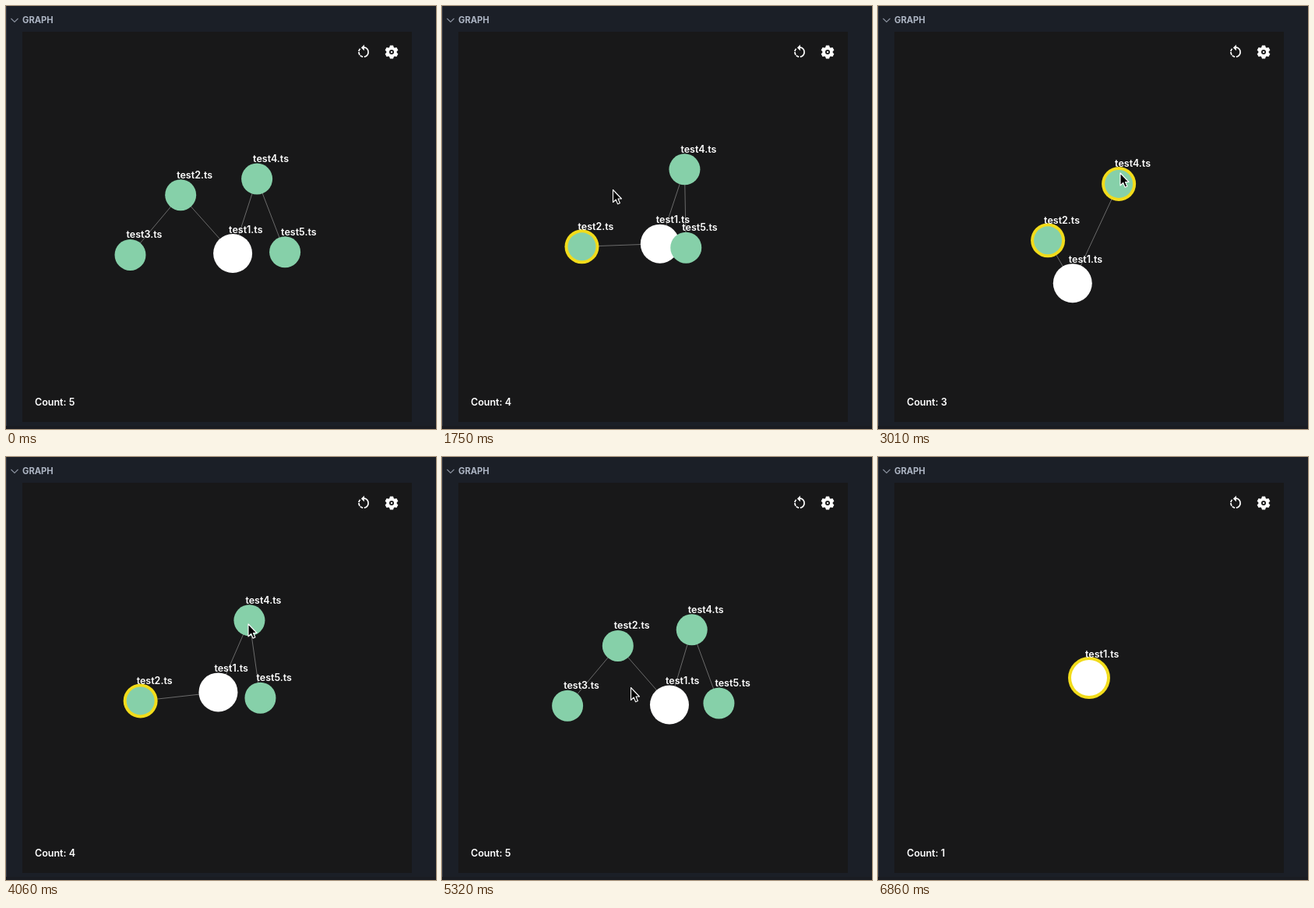
Animation, 552 px wide and 542 px high, one loop 7.07 s. Source, as an HTML page with a canvas:

```html
<!DOCTYPE html>
<html lang="en">
<head>
<meta charset="utf-8">
<title>Graph</title>
<style>
  html, body { margin: 0; width: 100%; height: 100%; overflow: hidden; background: #1b1f27; }
  canvas { display: block; }
</style>
</head>
<body>
<canvas></canvas>
<script>
const W = 552, H = 542, LOOP = 7070, STEP = 70;
const CENTER = [271, 283], LINK = 100.4;
const WHITE = '#fff', GREEN = '#86d0a9', YELLOW = '#f2dc1b', PANEL = '#181819';
const canvas = document.querySelector('canvas');
const ratio = window.devicePixelRatio || 1;
canvas.width = W * ratio;
canvas.height = H * ratio;
canvas.style.width = W + 'px';
canvas.style.height = H + 'px';
const ctx = canvas.getContext('2d');

// Each click starts a tree: links have a resting angle, and start off by a turn and a stretch.
const link = (from, to, angle, turn, stretch = 0) => ({ from, to, angle, turn, stretch });
const four = [link(1, 2, 171.8, 9), link(1, 4, -64.2, -11), link(4, 5, 78.8, 15)];
const five = [link(1, 2, -131.8, 6), link(2, 3, 130.1, 0), link(1, 4, -72, -14), link(4, 5, 69, 8)];
const three = [link(1, 2, 149, 91, -37), link(1, 4, -73, 8, 40)];
const scenes = [
  { at: -LOOP, links: five },
  { at: 1680, links: four, rings: [2] },
  { at: 3010, links: three, rings: [2, 4], tau: 90, drift: [-12, 11.5] },
  { at: 3780, links: four, rings: [2] },
  { at: 4900, links: five },
  { at: 6090, links: [], rings: [1] }
];

// Pointer stops: x, y, arrival and departure
const stop = (x, y, arrive, leave = arrive) => ({ x, y, arrive, leave });
const stops = [
  stop(318, 500, 70), stop(177, 205, 280), stop(246, 403, 420, 770), stop(240.5, 337.5, 840),
  stop(219.5, 235.5, 1050, 1960), stop(311, 214, 2450, 4130), stop(172, 308, 4620, 5040),
  stop(242.5, 295.5, 5320), stop(279.5, 314.5, 5600, 6370), stop(283, 560, 6860)
];
const arrow = new Path2D('M0 0V16l3.7-3.5 2.4 5.7 2.8-1.2-2.4-5.5H11z');

function rect(x, y, w, h, fill) {
  ctx.fillStyle = fill;
  ctx.fillRect(x, y, w, h);
}

function disc([x, y], r, fill) {
  ctx.beginPath();
  ctx.arc(x, y, r, 0, 2 * Math.PI);
  ctx.fillStyle = fill;
  ctx.fill();
}

function line(points, color, width) {
  ctx.beginPath();
  points.forEach(p => ctx.lineTo(...p));
  ctx.strokeStyle = color;
  ctx.lineWidth = width;
  ctx.stroke();
}

function text(s, x, y, color = WHITE, font = '600 12.5px') {
  ctx.font = font + ' Inter, Roboto, sans-serif';
  ctx.fillStyle = color;
  ctx.fillText(s, x, y);
}

function gear(x, y) {
  ctx.save();
  ctx.translate(x, y);
  disc([0, 0], 6.6, WHITE);
  for (let i = 0; i < 6; i++) {
    ctx.beginPath();
    ctx.moveTo(-3, -5.5);
    ctx.lineTo(-2, -8.5);
    ctx.lineTo(2, -8.5);
    ctx.lineTo(3, -5.5);
    ctx.fill();
    ctx.rotate(Math.PI / 3);
  }
  disc([0, 0], 3, PANEL);
  disc([0, 0], 1.2, WHITE);
  ctx.restore();
}

// Turning arrow: solid right half, three dashes on the left
function resetIcon(x, y) {
  const arc = (from, to) => {
    ctx.beginPath();
    ctx.arc(x, y, 6.1, from * Math.PI / 180, to * Math.PI / 180);
    ctx.stroke();
  };
  ctx.strokeStyle = ctx.fillStyle = WHITE;
  ctx.lineWidth = 1.75;
  arc(-82, 82);
  for (const a of [98, 143, 188]) arc(a, a + 36);
  ctx.beginPath();
  ctx.moveTo(x + 0.9, y - 9.5);
  ctx.lineTo(x - 3.1, y - 5.6);
  ctx.lineTo(x + 0.9, y - 1.7);
  ctx.fill();
}

function drawPanel() {
  rect(0, 0, W, H, '#1b1f27');
  rect(0, 0, 1, H, '#343a46');
  rect(0, 538, W, 4, '#1a1c22');
  rect(21, 33, 500, 500, PANEL);
  line([[6.5, 16], [11, 20.5], [15.5, 16]], '#8b929f', 1.1);
  text('GRAPH', 21, 22, '#adb5c3', '700 11.2px');
  resetIcon(459, 59);
  gear(495, 59);
}

// Places the tree around its centre of mass; k falls from 1 to 0 as it settles.
function layout({ links, drift = [0, 0] }, k) {
  const at = { 1: [0, 0] };
  for (const l of links) {
    const a = (l.angle + l.turn * k) * Math.PI / 180, r = LINK + l.stretch * k;
    const [x, y] = at[l.from];
    at[l.to] = [x + r * Math.cos(a), y + r * Math.sin(a)];
  }
  const all = Object.values(at);
  const shift = CENTER.map((c, i) =>
    c + drift[i] * k - all.reduce((sum, p) => sum + p[i], 0) / all.length);
  for (const p of all) p.forEach((v, i) => p[i] = v + shift[i]);
  return at;
}

function drawGraph(t) {
  const scene = scenes.findLast(s => s.at <= t);
  const { links, rings = [], tau = 180 } = scene;
  const at = layout(scene, Math.exp((scene.at - t) / tau));
  const nodes = Object.keys(at).map(Number);
  const radius = id => id === 1 ? 25 : 20;

  for (const l of links) line([at[l.from], at[l.to]], '#6b6b6b', 1);
  for (const id of nodes) {
    const r = radius(id), ringed = rings.includes(id);
    if (ringed) disc(at[id], r + 2, YELLOW);
    disc(at[id], ringed ? r - 2 : r, id === 1 ? WHITE : GREEN);
  }
  for (const id of nodes) text(`test${id}.ts`, at[id][0] - 5, at[id][1] - radius(id) - 1.5);
  text('Count: ' + nodes.length, 37, 512);
}

function drawPointer(t) {
  const next = stops.findIndex(s => s.arrive > t);
  if (next < 1) return;
  const a = stops[next - 1], b = stops[next];
  const k = Math.max(0, (t - a.leave) / (b.arrive - a.leave));
  ctx.save();
  ctx.translate(a.x + (b.x - a.x) * k, a.y + (b.y - a.y) * k);
  ctx.fillStyle = '#000';
  ctx.strokeStyle = WHITE;
  ctx.lineWidth = 1.1;
  ctx.lineJoin = 'round';
  ctx.fill(arrow);
  ctx.stroke(arrow);
  ctx.restore();
}

function draw(now) {
  const t = Math.floor((now % LOOP) / STEP) * STEP;
  ctx.setTransform(ratio, 0, 0, ratio, 0, 0);
  drawPanel();
  drawGraph(t);
  drawPointer(t);
}

let begin;
function tick(now) {
  begin ??= now;
  draw(now - begin);
  requestAnimationFrame(tick);
}
draw(0);
requestAnimationFrame(tick);
</script>
</body>
</html>
```
